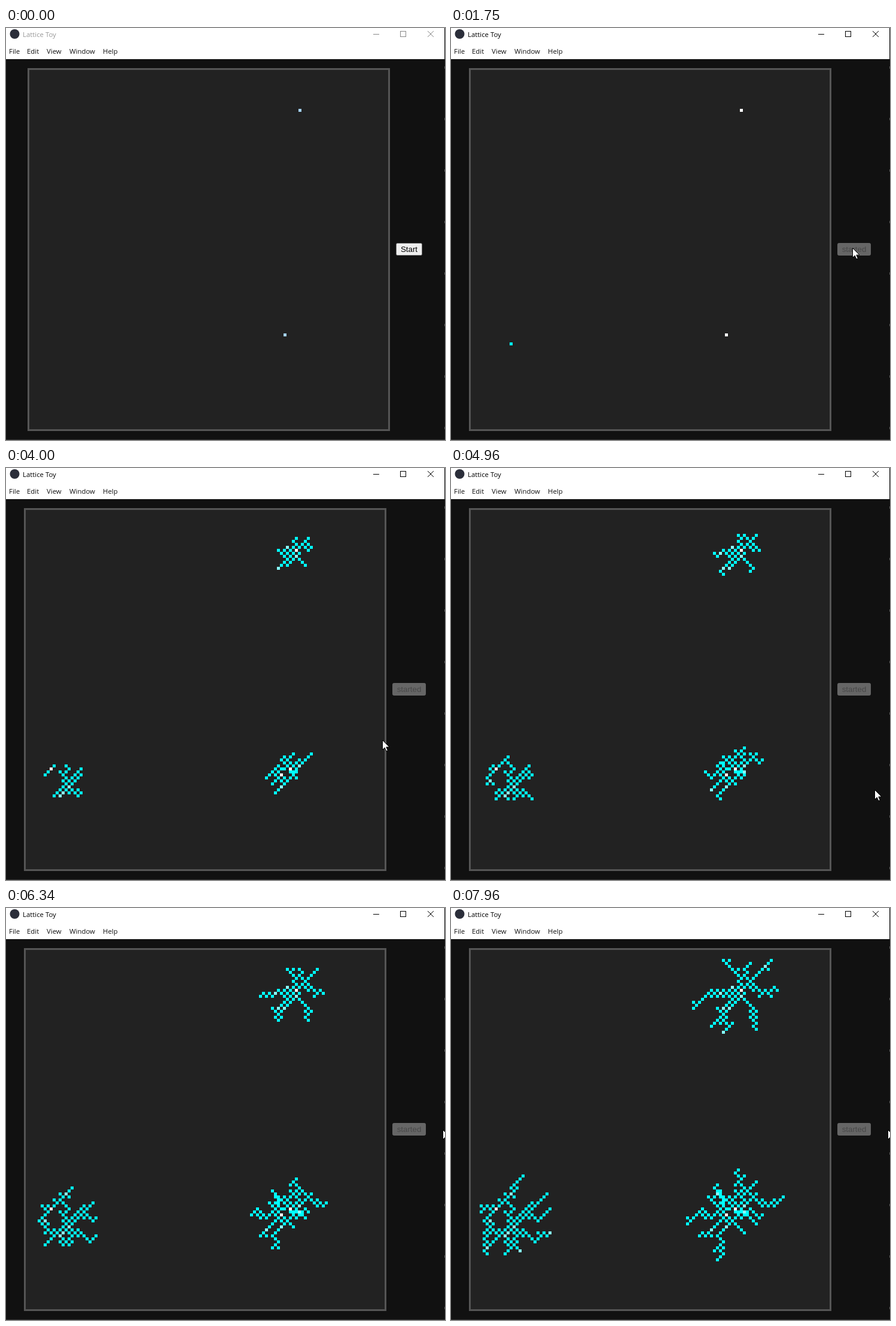
An HTML page for the animation above (8 s loop, 734 by 688 pixels).

```html
<!DOCTYPE html>
<html lang="en">
<head>
<meta charset="utf-8">
<title>Lattice Toy</title>
<style>
  html, body { margin: 0; width: 100%; height: 100%; overflow: hidden; background: #111; }
  svg { display: block; }
  .ui { font: 11.4px "Open Sans", sans-serif; fill: #111; }
  .button { font: 13.33px "Liberation Sans", Arial, sans-serif; text-anchor: middle; }
  .crisp { shape-rendering: crispEdges; }
</style>
</head>
<body>
<svg width="734" height="688" viewBox="0 0 734 688">
  <rect width="734" height="688" fill="#111"/>
  <rect width="733" height="52" fill="#fff"/>
  <rect y="687" width="734" height="1" fill="#333"/>
  <path class="crisp" d="M733.5 64V688" stroke="#555" stroke-dasharray="4 82"/>

  <circle cx="14.5" cy="10" r="8" fill="#2b2e3a"/>
  <text id="title" class="ui" x="28" y="15">Lattice Toy</text>
  <g id="controls" fill="none">
    <path class="crisp" d="M614 10.5H624M659.5 5.5h9v9h-9z"/>
    <path d="M705 5l10 10M715 5l-10 10"/>
  </g>
  <g class="ui">
    <text x="5" y="43">File</text>
    <text x="35" y="43">Edit</text>
    <text x="68" y="43">View</text>
    <text x="106" y="43">Window</text>
    <text x="162" y="43">Help</text>
  </g>

  <g id="board" class="crisp">
    <rect x="1.5" y="68.5" width="603" height="603" fill="#222" stroke="#555" stroke-width="3"/>
    <g id="cells" transform="translate(3 70) scale(5)"></g>
  </g>

  <rect id="box" y="359.5" height="20" rx="2"/>
  <text id="label" class="button" x="674" y="374"></text>
  <path id="cursor" d="M.5 .5V16.5L4.2 13L6.8 18.8L9.3 17.7L6.8 12H12z" fill="#fff" stroke="#000"/>
</svg>
<script>
const LOOP = 8000, ACTIVE = 1550, STARTED = 1690;
const WHITE = '#fff', CYAN = '#0ff', PALE = '#8ff', IDLE = '#a3d0ee';

const $ = id => document.getElementById(id);
const set = (el, attrs) => {
  for (const key in attrs) el.setAttribute(key, attrs[key]);
  return el;
};

let state = 29;
const random = () => (state = state * 16807 % 2147483647) / 2147483647;
const pick = list => list[Math.floor(random() * list.length)];
const sign = () => random() < 0.5 ? 1 : -1;

const cells = new Map();
const has = (x, y) => cells.has(x + ',' + y);

function addCell(x, y, birth, fill = random() < 0.04 ? PALE : CYAN) {
  if (has(x, y)) return;
  const el = document.createElementNS('http://www.w3.org/2000/svg', 'rect');
  $('cells').append(set(el, { x, y, width: 1, height: 1 }));
  cells.set(x + ',' + y, { x, y, birth, fill, el });
}

// Walks diagonally from a seed to each tip, then hangs buds on the arms.
function grow(x, y, start, fill, tips) {
  addCell(x, y, fill === WHITE && start === STARTED ? 0 : start, fill);
  const arms = [];
  for (const [tipX, tipY] of tips) {
    const steps = Math.max(Math.abs(tipX - x), Math.abs(tipY - y));
    let px = x, py = y;
    for (let i = 1; i <= steps; i++) {
      const left = steps - i + 1;
      px += random() < (1 + (tipX - px) / left) / 2 ? 1 : -1;
      py += random() < (1 + (tipY - py) / left) / 2 ? 1 : -1;
      const birth = start + (LOOP - 60 - start) * (i / steps) ** 1.2;
      addCell(px, py, birth);
      arms.push([px, py, birth]);
    }
  }
  for (let i = 0; i < tips.length * 6; i++) {
    const [ax, ay, birth] = pick(arms);
    const bx = ax + sign(), by = ay + sign();
    const crowd = [-1, 1].flatMap(dx => [-1, 1].filter(dy => has(bx + dx, by + dy)));
    if (crowd.length < 3) addCell(bx, by, birth + 1200 * random());
  }
}

grow(90, 13, STARTED, WHITE, [
  [84, 3], [93, 4], [100, 3], [102, 13], [100, 15], [95, 26], [84, 27], [80, 25], [74, 17], [80, 13]
]);
grow(85, 88, STARTED, WHITE, [
  [72, 89], [76, 95], [82, 103], [91, 94], [97, 88], [79, 82], [83, 80]
]);
grow(88, 86, 1950, WHITE, [[104, 82], [95, 77], [89, 73], [82, 78], [95, 91]]);
grow(13, 91, STARTED, CYAN, [
  [17, 75], [25, 81], [26, 86], [26, 94], [16, 100], [11, 101], [5, 101], [4, 94]
]);
grow(8, 86, 3300, WHITE, [[3, 85], [14, 80], [4, 98]]);

// Cursor stops: [time, x, y].
const PATH = [
  [180, 633, 652], [740, 656, 363], [880, 656, 363], [1090, 672, 366], [1720, 672, 366],
  [2310, 604, 451], [3250, 604, 451], [4000, 629, 454], [4830, 708, 537],
  [5000, 708, 537], [5650, 730, 420], [6000, 730, 370]
];

function cursorAt(t) {
  const next = PATH.findIndex(p => p[0] > t);
  if (next < 0) return PATH[PATH.length - 1].slice(1);
  const [t0, x0, y0] = PATH[next - 1], [t1, x1, y1] = PATH[next];
  const k = (t - t0) / (t1 - t0), ease = k * k * (3 - 2 * k);
  return [x0 + (x1 - x0) * ease, y0 + (y1 - y0) * ease];
}

function draw(t) {
  const active = t >= ACTIVE, started = t >= STARTED, hover = t >= 700;
  $('title').style.fill = active ? '#000' : '#999';
  set($('controls'), { stroke: active ? '#000' : '#888' });
  set($('board'), { transform: `translate(${started ? 30 : 36} 0)` });

  set($('box'), {
    x: started ? 646.5 : 652.5,
    width: started ? 55 : 43,
    fill: started ? '#666' : hover ? '#e5e5e5' : '#efefef',
    stroke: started ? '#666' : hover ? '#555' : '#767676'
  });
  set($('label'), { fill: started ? '#484848' : '#000' }).textContent = started ? 'started' : 'Start';

  for (const { el, birth, fill } of cells.values())
    set(el, { visibility: t >= birth ? 'visible' : 'hidden', fill: started ? fill : IDLE });

  const shown = t >= 180;
  set($('cursor'), { visibility: shown ? 'visible' : 'hidden' });
  if (shown) set($('cursor'), { transform: `translate(${cursorAt(t).map(Math.round)})` });
}

const begin = performance.now();
function tick() {
  draw((performance.now() - begin) % LOOP);
  requestAnimationFrame(tick);
}
tick();
</script>
</body>
</html>
```
